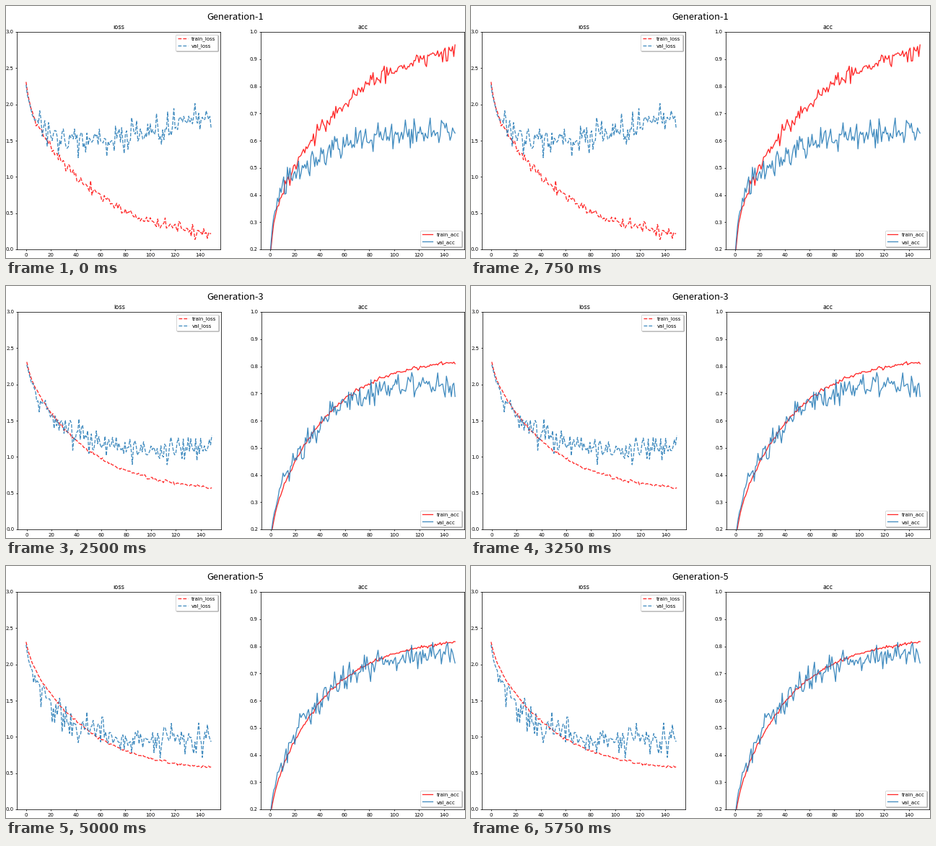
A matplotlib script that plays this animation: 636 px wide and 350 px high, repeating every 6250 ms.

```python
import numpy as np
import matplotlib.pyplot as plt
from matplotlib.animation import FuncAnimation
from matplotlib.patches import Rectangle

W, H, DPI = 636, 350, 100
PX = 72 / DPI          # one pixel in points
RED, BLUE = "#ff0000", "#1f77b4"

plt.rcParams.update({
    "font.family": "DejaVu Sans",
    "axes.titlesize": 8.1 * PX,
    "axes.titlepad": 3.6 * PX,
    "axes.linewidth": 0.75 * PX,
    "lines.linewidth": 1.3 * PX,
    "legend.fontsize": 7.05 * PX,
    "patch.linewidth": 0.7 * PX,
})
for tick in ("xtick", "ytick"):
    plt.rcParams.update({
        f"{tick}.labelsize": 6.9 * PX,
        f"{tick}.major.size": 2.4 * PX,
        f"{tick}.major.pad": 2.2 * PX,
        f"{tick}.major.width": 0.75 * PX,
    })

EPOCHS = np.arange(150)
SHADOW = {"ox": 0.9, "oy": -0.9, "alpha": 0.35}


def curve(rng, start, noise, end, amp, tau, slope=0):
    """Quick drop from start, slow decay towards end, plus seeded jitter."""
    kick = start - end - amp
    trend = (end + amp * np.exp(-EPOCHS / tau) + slope * EPOCHS
             + kick * np.exp(-EPOCHS / 3))
    jitter = np.clip(rng.standard_t(5, EPOCHS.size), -2.8, 2.8)
    return trend + noise * jitter * np.clip(EPOCHS / 12, 0, 1)


def run(seed, train_loss, val_loss, train_acc, val_acc, rough=1):
    """The four curves of one training run; rough scales the train jitter."""
    rng = np.random.default_rng(seed)
    return [
        curve(rng, 2.31, 0.009 * rough, *train_loss),
        curve(rng, 2.27, 0.085, *val_loss),
        curve(rng, 0.16, 0.003 * rough, *train_acc),
        curve(rng, 0.17, 0.019, *val_acc),
    ]


# Each curve: end level, amplitude, decay time, optional slope
late_loss, late_acc = (0.50, 1.66, 48), (0.835, -0.605, 44)
RUNS = [
    run(1, (0.05, 1.95, 58), (1.20, 0.68, 25, 0.0042),
        (0.995, -0.68, 62), (0.64, -0.27, 38), rough=4),
    run(2, (0.58, 1.45, 55), (0.76, 1.32, 32, 0.0027),
        (0.805, -0.565, 43), (0.74, -0.46, 38)),
    run(3, late_loss, (1.00, 1.15, 27, 0.001), late_acc, (0.75, -0.50, 36)),
    run(4, late_loss, (0.95, 1.15, 26, 0.0007), late_acc, (0.765, -0.52, 36)),
    run(5, late_loss, (0.83, 1.20, 30, 0.0008), late_acc, (0.785, -0.52, 38)),
]
# Small drift of the plots in pixels: (dx, dy)
SHIFT = [(0, 0), (1, 1), (1, 0), (0, 0), (0, 0)]

fig = plt.figure(figsize=(W / DPI, H / DPI), dpi=DPI, facecolor="white")


def panel(name, style, ylim, loc):
    ax = fig.add_axes([0.1, 0.1, 0.4, 0.8], label=name)
    ax.set_title(name)
    ax.set_xlim(-7.45, 156.45)
    ax.set_ylim(*ylim)
    ax.set_xticks(range(0, 141, 20))
    lines = [ax.plot(EPOCHS, EPOCHS, style, color=color, alpha=0.85,
                     label=f"{kind}_{name}")[0]
             for kind, color in (("train", RED), ("val", BLUE))]
    ax.legend(loc=loc, shadow=SHADOW)
    return ax, lines


loss_ax, loss_lines = panel("loss", "--", (0, 3), "upper right")
acc_ax, acc_lines = panel("acc", "-", (0.2, 1), "lower right")
lines = loss_lines + acc_lines

# White header strip that trims the plot titles
strip = fig.add_artist(Rectangle((0, 1), 1, -27 / H, transform=fig.transFigure,
                                 facecolor="white", edgecolor="none", zorder=5))
head = fig.text(318 / W, 1 - 19.3 / H, "", ha="center", va="baseline", zorder=6,
                family="Noto Sans CJK JP", size=12.9 * PX, color="black")


def place(ax, left, dx, dy):
    left, right = left + dx, min(left + 282 + dx, W - 1)
    top, bottom = 36 + dy, 338
    ax.set_position([left / W, 1 - bottom / H,
                     (right - left) / W, (bottom - top) / H])


def update(i):
    dx, dy = SHIFT[i]
    place(loss_ax, 15, dx, dy)
    place(acc_ax, 353, dx, dy)
    strip.set_height((dx - 27) / H)
    for line, y in zip(lines, RUNS[i]):
        line.set_ydata(y)
    head.set_text(f"Generation-{i + 1}")
    return lines + [head]


anim = FuncAnimation(fig, update, frames=len(RUNS), interval=1250,
                     repeat=True, repeat_delay=0, blit=False)
plt.show()
```
